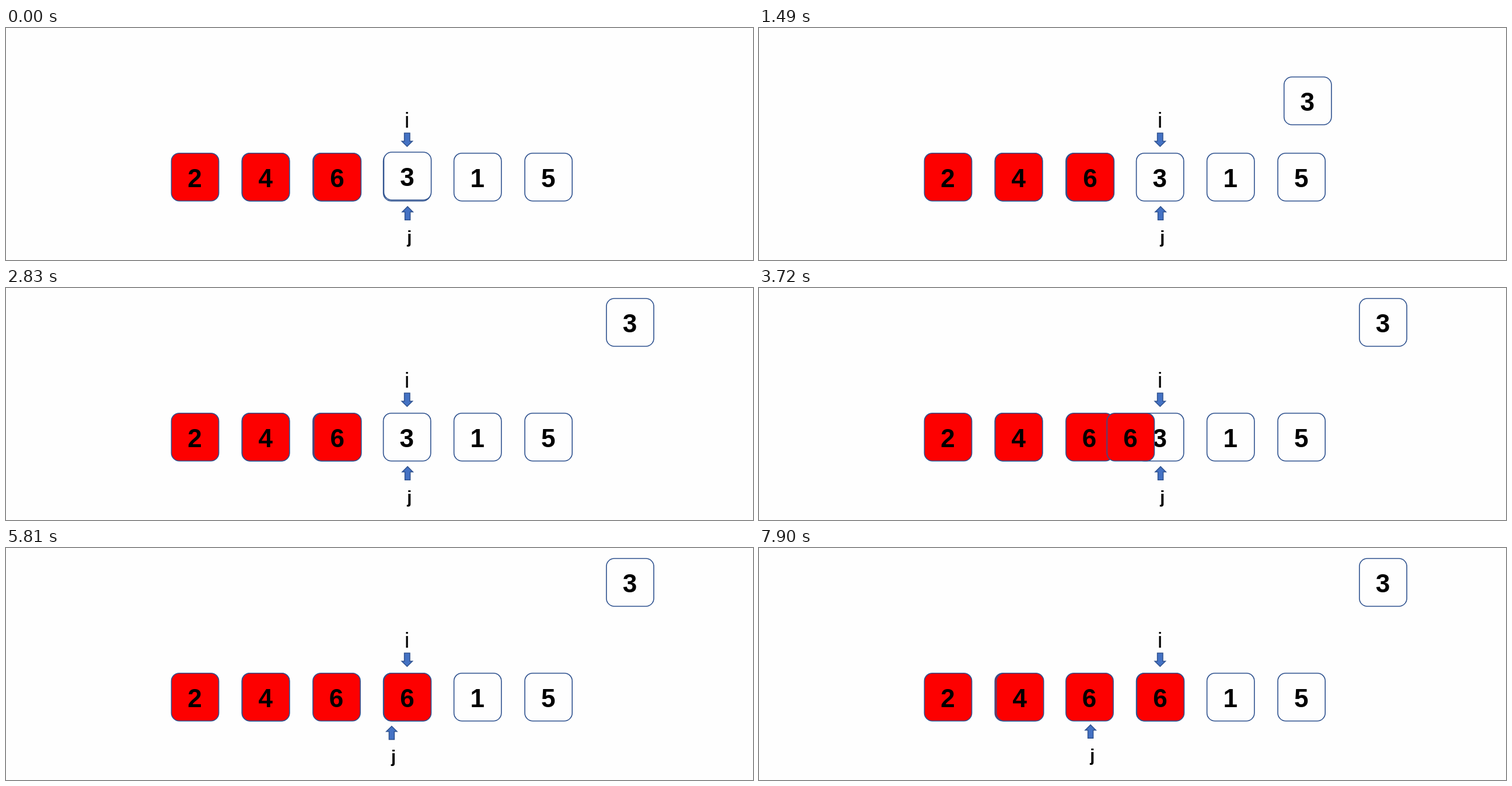
An HTML page for the animation above (8 s loop, 1280 by 398 pixels).

```html
<!DOCTYPE html>
<html lang="en">
<head>
<meta charset="utf-8">
<title>Insertion sort</title>
<style>
  html, body { margin: 0; width: 100%; height: 100%; overflow: hidden; background: #fefefe; }
  svg { display: block; width: 1280px; height: 398px; }
  text { font-family: "Liberation Sans", Arial, sans-serif; fill: #000; }
  .box rect { fill: #fefefe; stroke: #2f528f; stroke-width: 1.6px; }
  .box.sorted rect { fill: #fd0000; }
  .box text { font-size: 44px; font-weight: 700; text-anchor: middle; }
  .arrow { fill: #4472c4; stroke: #2f528f; stroke-width: 1.5px; }
  .i { font-size: 37px; text-anchor: middle; }
  .j { font-size: 29px; font-weight: 700; }
</style>
</head>
<body>
<svg id="stage" viewBox="0 0 1280 398">
  <g id="row"></g>
  <text class="i" x="687.2" y="171">i</text>
  <path class="arrow" d="M682.6 180.2H692V194.2H696.4L687.3 203.2L678.2 194.2H682.6Z"/>
  <g id="j">
    <path class="arrow" d="M683.6 329.3H692.6V315.4H697.2L688.1 306.4L679 315.4H683.6Z"/>
    <text class="j" x="687.2" y="369">j</text>
  </g>
  <g id="copies"></g>
</svg>
<script>
  const LOOP = 8000, MOVE = 1800;
  const TICK = 149.2, FIRST = 437;   // the picture advances in ticks
  const NS = "http://www.w3.org/2000/svg";
  const $ = id => document.getElementById(id);

  function add(parent, tag, attrs) {
    const el = document.createElementNS(NS, tag);
    for (const k in attrs) el.setAttribute(k, attrs[k]);
    return parent.appendChild(el);
  }

  function box(parent, x, y, digit, sorted) {
    const g = add(parent, "g", { class: sorted ? "box sorted" : "box" });
    add(g, "rect", { x, y, width: 81.2, height: 82, rx: 13.6 });
    add(g, "text", { x: x + 40.2, y: y + 58.3 }).textContent = digit;
    return g;
  }

  const xs = [283.4, 404.3, 525.9, 646.6, 767.6, 889];
  [2, 4, 6, 3, 1, 5].forEach((d, n) => box($("row"), xs[n], 214.7, d, n < 3));

  const four = box($("copies"), 404.6, 214.7, 4, true);
  const three = box($("copies"), 647.4, 213, 3, false);
  const six = box($("copies"), 527.2, 214.7, 6, true);

  const moves = [
    { el: three, start: 426, dx: 381.4, dy: -195 },
    { el: six, start: 2753, dx: 120.1, dy: 0 },
    { el: $("j"), start: 5206, dx: -120, dy: -3 },
    { el: four, start: 7740, dx: 121, dy: 0 }
  ];

  // constant acceleration, then constant braking
  function ease(u) {
    u = Math.min(1, Math.max(0, u));
    return u < 0.5 ? 2 * u * u : 1 - 2 * (1 - u) * (1 - u);
  }

  function draw(now) {
    const t = FIRST + TICK * Math.floor((now % LOOP - FIRST) / TICK) + 4;
    for (const m of moves) {
      const p = ease((t - m.start) / MOVE);
      m.el.setAttribute("transform", `translate(${m.dx * p} ${m.dy * p})`);
    }
  }

  const begin = performance.now();
  function loop() {
    draw(performance.now() - begin);
    requestAnimationFrame(loop);
  }
  loop();
</script>
</body>
</html>
```
